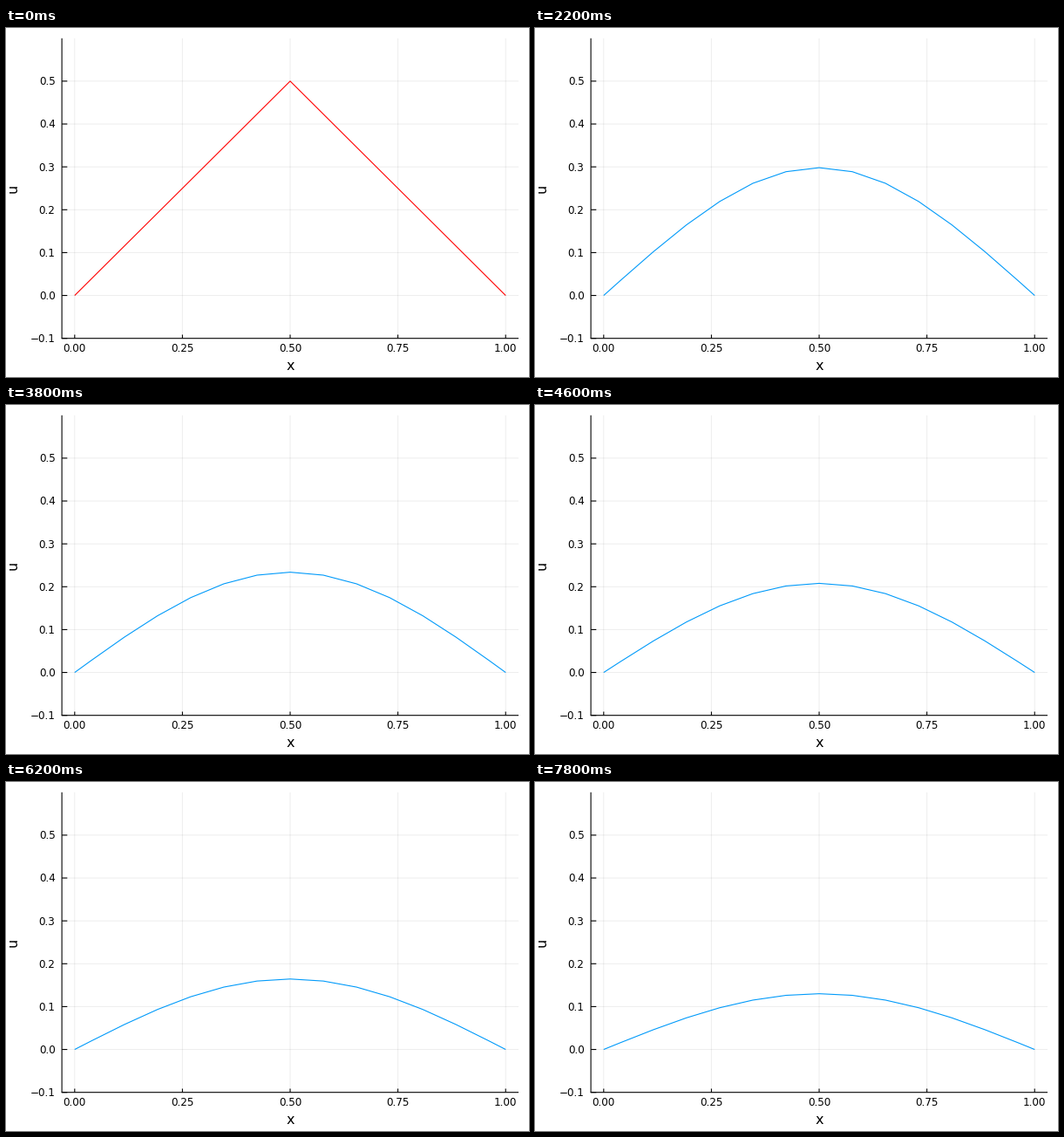
These frames come from a looping animation (600 px wide and 400 px high, 8 s). A matplotlib script:

```python
import numpy as np
import matplotlib.pyplot as plt
from matplotlib.animation import FuncAnimation

W, H, DPI = 600, 400, 100
PT = 72 / DPI                      # points per pixel
LEFT, RIGHT, TOP, BOTTOM = 64.1, 588.0, 11.8, 355.7
CELLS, STEP = 13, 0.00298
FRAMES, INTERVAL = 40, 200

plt.rcParams["font.family"] = "DejaVu Sans"

fig = plt.figure(figsize=(W / DPI, H / DPI), dpi=DPI, facecolor="white")
ax = fig.add_axes([0, 0, 1, 1])
ax.set(xlim=(0, W), ylim=(H, 0))
ax.axis("off")


def px(x):
    return 78.8 + 494.4 * np.asarray(x)


def py(u):
    return 306.55 - 491.3 * np.asarray(u)


def stroke(xs, ys, color="black", width=1.0, **kw):
    line, = ax.plot(xs, ys, color=color, lw=width * PT, snap=False,
                    solid_capstyle="butt", solid_joinstyle="round", **kw)
    return line


def label(x, y, text, size, **kw):
    ax.text(x, y, text, fontsize=size * PT, va="baseline", **kw)


# Grid, ticks and tick labels
for v in np.linspace(0, 1, 5):
    x = px(v)
    stroke([x, x], [TOP, BOTTOM], alpha=0.07)
    stroke([x, x], [BOTTOM, BOTTOM - 4.2], width=1.1)
    label(x, 371.3, f"{v:.2f}", 12, ha="center")

for i in range(-1, 6):
    y = py(i / 10)
    if i >= 0:
        stroke([LEFT, RIGHT], [y, y], alpha=0.07)
    stroke([LEFT, LEFT + 6.2], [y, y], width=1.1)
    label(56.6, y + 4.4, f"{i / 10:.1f}".replace("-", "\u2212"), 12, ha="right")

stroke([LEFT, LEFT], [TOP, BOTTOM], width=1.1)
stroke([LEFT - 0.5, RIGHT], [BOTTOM, BOTTOM], width=1.1)
label(326, 391.6, "x", 16, ha="center")
ax.text(16, 183.8, "u", fontsize=16 * PT, rotation=90,
        ha="right", va="center", rotation_mode="default")

# Heat equation on cell centres, solved by its discrete sine modes
centers = (np.arange(CELLS) + 0.5) / CELLS
nodes = np.concatenate(([0], centers, [1]))
odd = np.arange(1, CELLS + 1, 2)
rates = 4 * CELLS**2 * np.sin(odd * np.pi / (2 * CELLS)) ** 2
modes = np.sin(np.pi * np.outer(odd, centers))
tent = np.minimum(centers, 1 - centers)
amps = modes @ tent / (modes**2).sum(axis=1)

curve = stroke(px(nodes), py(0 * nodes), width=1.1, zorder=5)


def draw(k):
    u = (amps * np.exp(-rates * STEP * k)) @ modes
    curve.set_ydata(py(np.concatenate(([0], u, [0]))))
    curve.set_color("#ff0000" if k == 0 else "#009afa")
    return curve,


anim = FuncAnimation(fig, draw, frames=FRAMES, interval=INTERVAL,
                     init_func=lambda: draw(0), repeat=True, repeat_delay=0)
plt.show()
```
